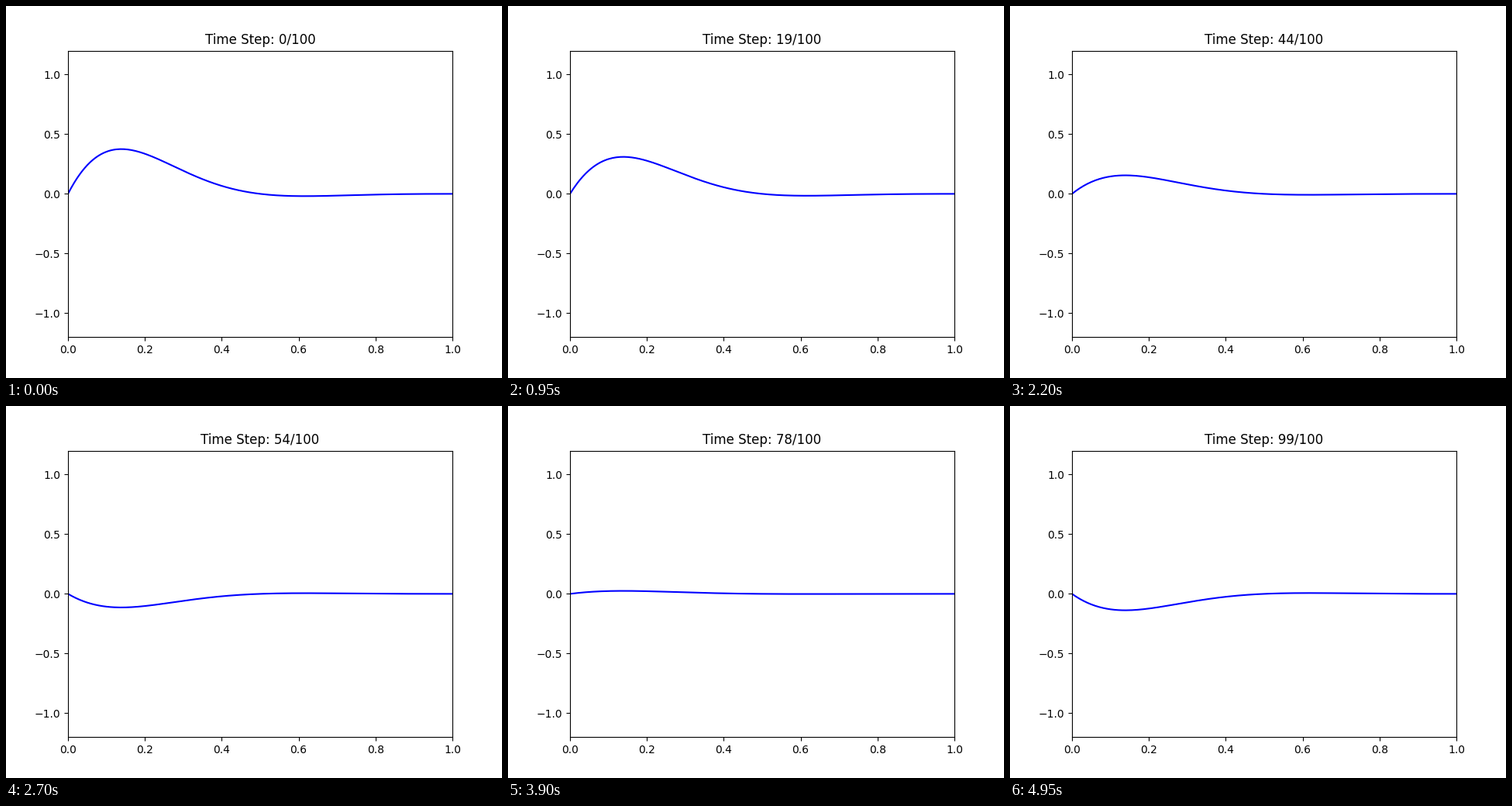
Recreate the animation shown at these times as a matplotlib script. Size 640 by 480 pixels, loop 5000 ms.

```python
import numpy as np
import matplotlib.pyplot as plt
from matplotlib.animation import FuncAnimation

STEPS = 100
INTERVAL = 50

x = np.linspace(0, 1, 200)
shape = np.sin(2 * np.pi * x) * np.exp(-5 * x) * (1 - x**2)


def amplitude(t):
    """Decaying oscillation whose frequency varies over the loop."""
    freq = 0.5 * (1 - np.sin(2 * np.pi * t))
    return np.exp(-t) * np.cos(2 * np.pi * freq * t)


fig, ax = plt.subplots(figsize=(6.4, 4.8), dpi=100)
ax.set_xlim(0, 1)
ax.set_ylim(-1.2, 1.2)
line, = ax.plot(x, shape, color="blue", lw=1.5)
title = ax.set_title(f"Time Step: 0/{STEPS}")


def update(step):
    line.set_ydata(amplitude(step / STEPS) * shape)
    title.set_text(f"Time Step: {step}/{STEPS}")
    return line, title


anim = FuncAnimation(fig, update, frames=STEPS, interval=INTERVAL,
                     repeat=True, repeat_delay=0, blit=False)
plt.show()
```
